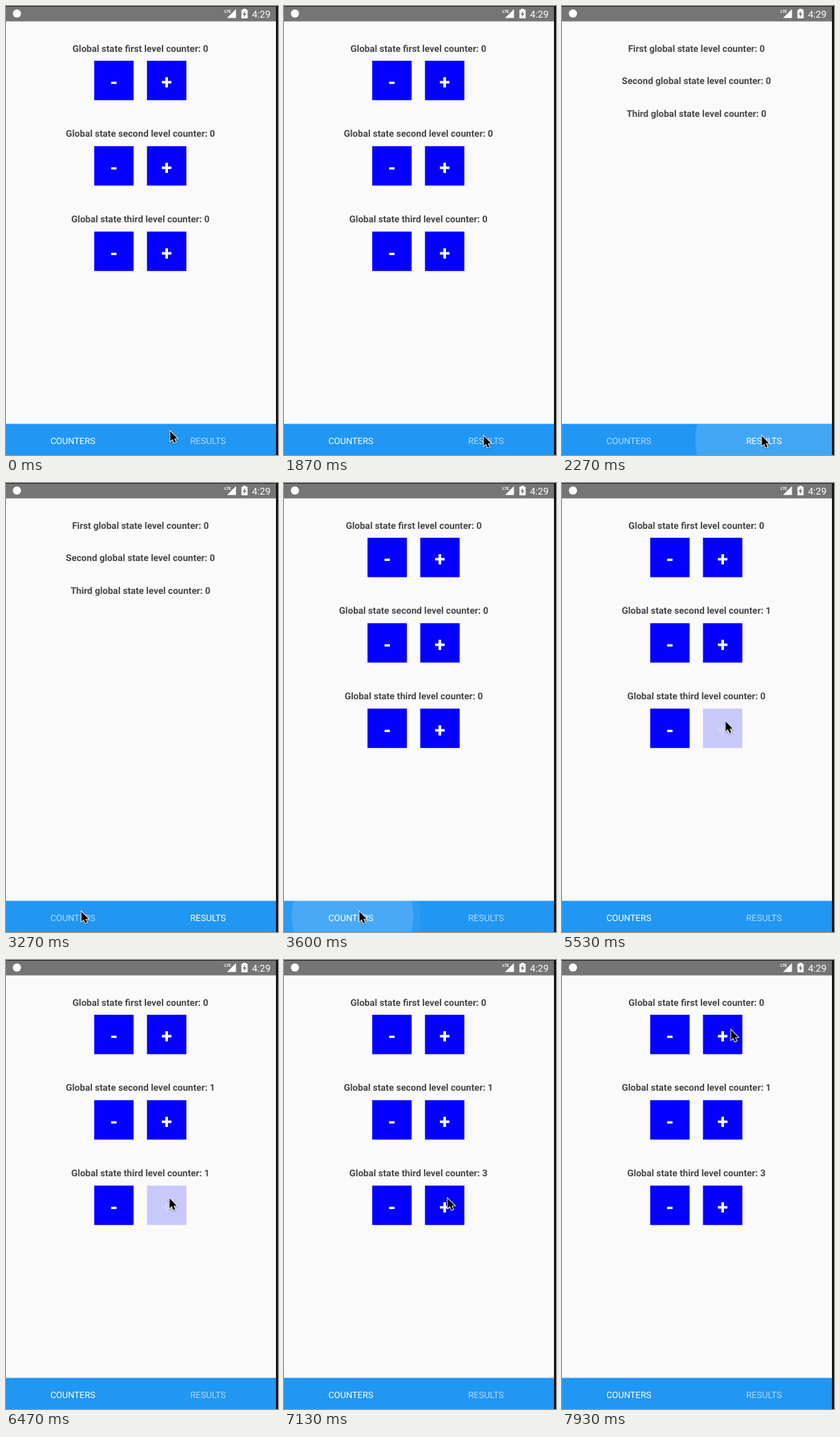
Write an HTML page with a canvas that moves like this. It is 398 by 656 pixels and loops after 8 s.

```html
<!DOCTYPE html>
<html lang="en">
<head>
<meta charset="utf-8">
<title>Global state counters</title>
<style>
  html, body { margin: 0; width: 100%; height: 100%; overflow: hidden; background: #fafafa; }
  canvas { display: block; }
</style>
</head>
<body>
<canvas id="stage" width="398" height="656"></canvas>
<script>
const ctx = document.getElementById('stage').getContext('2d');
const LOOP = 8000, WIDTH = 395, CENTER = 196.7, BAR_TOP = 610.5;
const ROW_STEP = 124.8, BUTTON = 57.6;

const clamp = v => Math.min(1, Math.max(0, v));
const smooth = v => v * v * (3 - 2 * v);
const quintOut = v => 1 - (1 - clamp(v)) ** 5;

// Each press on a "+" button lasts 200 ms and counts on release.
const PRESS_TIME = 200;
const presses = [
  { at: 4600, row: 1 },
  { at: 5530, row: 2 },
  { at: 6470, row: 2 },
  { at: 6930, row: 2 }
];

const taps = [
  { at: 1870, from: [292, 628], center: [296, 633] },
  { at: 3270, from: [110, 626], center: [99, 633] }
];

const cursorStart = [240, 621];
const moves = [
  { from: 10, until: 470, via: [262, 608], to: [292, 628] },
  { from: 2690, until: 3070, via: [200, 634], to: [110, 626] },
  { from: 4210, until: 4480, via: [300, 330], to: [244, 231] },
  { from: 4800, until: 5270, via: [246, 290], to: [239, 348] },
  { from: 7290, until: 7930, via: [234, 30], to: [247, 102] }
];

function text(string, x, y, font, color, align = 'center') {
  ctx.font = `${font} Roboto, sans-serif`;
  ctx.fillStyle = color;
  ctx.textAlign = align;
  ctx.fillText(string, x, y);
}

function rect(x, y, w, h, color) {
  ctx.fillStyle = color;
  ctx.fillRect(x, y, w, h);
}

function circle(x, y, r, color) {
  ctx.fillStyle = color;
  ctx.beginPath();
  ctx.arc(x, y, r, 0, Math.PI * 2);
  ctx.fill();
}

function polygon(points) {
  ctx.beginPath();
  points.forEach(([x, y]) => ctx.lineTo(x, y));
  ctx.closePath();
}

function clipped(x, y, w, h, draw) {
  ctx.save();
  ctx.beginPath();
  ctx.rect(x, y, w, h);
  ctx.clip();
  draw();
  ctx.restore();
}

const label = (string, x, y) => text(string, x, y, 'bold 13.6px', '#484848');

// Background and sign fade separately, so the sign almost vanishes.
function button(sign, x, y, pressed) {
  ctx.globalAlpha = pressed ? 0.2 : 1;
  rect(x, y, BUTTON, BUTTON, '#0500ff');
  text(sign, x + BUTTON / 2, y + 41, 'bold 28.8px', '#fff');
  ctx.globalAlpha = 1;
}

function counts(t) {
  return [0, 1, 2].map(row =>
    presses.filter(p => p.row === row && t >= p.at + PRESS_TIME).length);
}

function countersPage(t, offset) {
  const values = counts(t);
  ['first', 'second', 'third'].forEach((name, row) => {
    const y = 80 + row * ROW_STEP;
    const pressed = presses.some(p => p.row === row && t >= p.at && t < p.at + PRESS_TIME);
    label(`Global state ${name} level counter: ${values[row]}`, offset + CENTER, y - 13.5);
    button('-', offset + 129.1, y, false);
    button('+', offset + 206.3, y, pressed);
  });
}

function resultsPage(t, offset) {
  const values = counts(t);
  ['First', 'Second', 'Third'].forEach((name, row) =>
    label(`${name} global state level counter: ${values[row]}`, offset + CENTER, 66.5 + row * 47.6));
}

// 0 shows the counters, 1 shows the results.
function pagePosition(t) {
  if (t < 2110) return 0;
  if (t < 3490) return quintOut((t - 2040) / 200);
  return 1 - quintOut((t - 3490) / 200);
}

function ripple(t, tap) {
  const age = t - tap.at;
  if (age <= 0 || age > 830) return;
  const radius = 101, growth = clamp(age / 375);
  const strength = clamp(age / 100) * (1 - clamp((age - 300) / 530));
  const [x, y] = tap.from.map((v, i) => v + (tap.center[i] - v) * growth);
  circle(...tap.center, radius, `rgba(255,255,255,${0.045 * strength})`);
  circle(x, y, radius * growth, `rgba(255,255,255,${0.15 * strength})`);
}

function tabBar(t, position) {
  rect(0, BAR_TOP, WIDTH, 656 - BAR_TOP, '#2196f3');
  clipped(0, BAR_TOP, WIDTH, 46, () => taps.forEach(tap => ripple(t, tap)));
  const tint = active => `rgba(255,255,255,${0.65 + 0.35 * active})`;
  text('COUNTERS', 97.8, 639.6, '13px', tint(1 - position));
  text('RESULTS', 295.7, 639.6, '13px', tint(position));
}

function statusBar() {
  rect(0, 0, WIDTH, 22.5, '#757575');
  rect(0, 0, 398, 1, '#222');
  circle(16, 11, 6, '#fff');
  text('LTE', 319.5, 10, 'bold 6px', '#fff', 'left');
  ctx.fillStyle = '#fff';
  polygon([[336.5, 4.5], [336.5, 17.5], [323.5, 17.5]]);
  ctx.fill();
  rect(344.5, 5.5, 9, 12.5, '#fff');
  rect(347, 4, 4, 2, '#fff');
  ctx.fillStyle = '#757575';
  polygon([[350, 7], [346.3, 12.5], [348.5, 12.5], [348, 16.5], [351.7, 11], [349.5, 11]]);
  ctx.fill();
  text('4:29', 373.5, 16.5, '14px', '#fff');
}

function cursorAt(t) {
  let point = cursorStart;
  for (const { from, until, via, to } of moves) {
    const k = smooth(clamp((t - from) / (until - from)));
    point = point.map((v, i) => (1 - k) ** 2 * v + 2 * k * (1 - k) * via[i] + k * k * to[i]);
  }
  return point;
}

function cursor(x, y) {
  ctx.save();
  ctx.translate(x + 0.4, y + 0.3);
  polygon([[0, 0], [0, 14.5], [3.3, 11.5], [5.7, 17], [8.2, 16], [5.9, 10.6], [10.3, 10.4]]);
  ctx.shadowColor = 'rgba(0,0,0,0.4)';
  ctx.shadowBlur = 2;
  ctx.shadowOffsetY = 1;
  ctx.strokeStyle = '#fff';
  ctx.lineWidth = 1.8;
  ctx.stroke();
  ctx.shadowColor = 'transparent';
  ctx.fillStyle = '#000';
  ctx.fill();
  ctx.restore();
}

function draw(t) {
  const position = pagePosition(t);
  rect(0, 0, 398, 656, '#fafafa');
  if (position < 1) countersPage(t, -position * WIDTH);
  if (position > 0) resultsPage(t, (1 - position) * WIDTH);
  statusBar();
  tabBar(t, position);
  rect(WIDTH, 0, 3, 656, '#141414');
  cursor(...cursorAt(t));
}

ctx.textRendering = 'geometricPrecision';
const start = performance.now();
function frame() {
  draw((performance.now() - start) % LOOP);
  requestAnimationFrame(frame);
}
frame();
</script>
</body>
</html>
```
